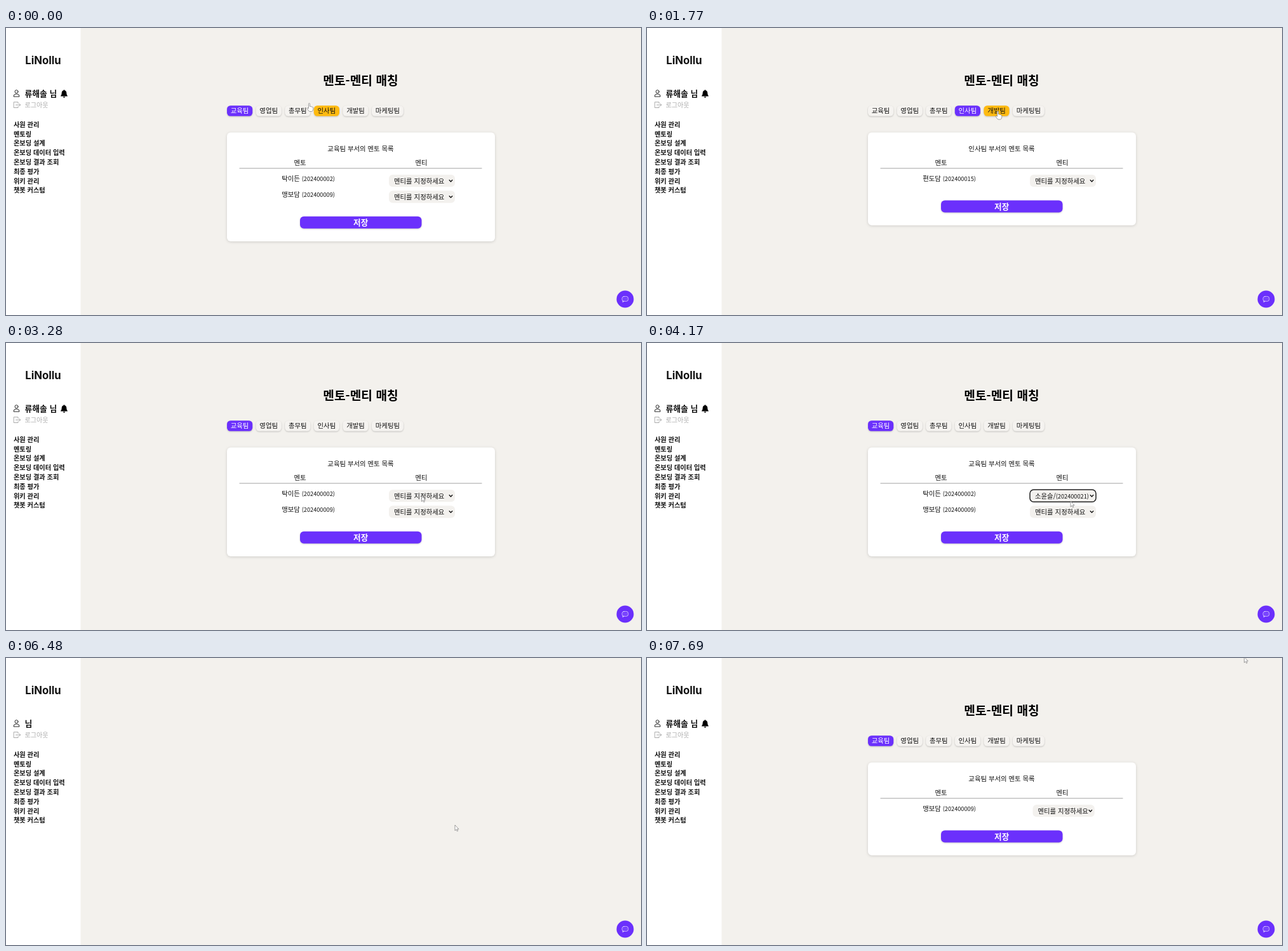
An HTML page that plays this animation: 1000 by 452 pixels, repeating every 7760 ms.

```html
<!DOCTYPE html>
<html lang="ko">
<head>
<meta charset="utf-8">
<title>멘토-멘티 매칭</title>
<style>
  html, body { margin: 0; width: 100%; height: 100%; overflow: hidden; background: #f3f1ed; }
  svg { display: block; width: 1000px; height: 452px; }
  text { font-family: "Noto Sans CJK KR", "Noto Sans CJK", sans-serif; font-size: 10.4px; fill: #111; }
  .b { font-weight: 700; }
  .m { text-anchor: middle; }
  .num { font-size: 9.2px; }
  .logo { font: 700 16.7px Inter, sans-serif; }
  .title { font-size: 19.2px; fill: #000; }
  .user { font-size: 12.8px; }
  .menu { font-size: 10.2px; }
  .exit { font-size: 10.1px; fill: #aaa; }
  .save { font-size: 12.6px; fill: #fff; }
  .on { fill: #fff; }
  .line { fill: none; stroke-linecap: round; stroke-linejoin: round; }
  .soft { filter: drop-shadow(.5px 1px 1.2px rgba(0, 0, 0, .2)); }
  .card { filter: drop-shadow(0 1px 2px rgba(0, 0, 0, .15)); }
</style>
</head>
<body>
<svg viewBox="0 0 1000 452">
  <rect width="1000" height="452" fill="#f3f1ed"/>
  <rect width="117.5" height="452" fill="#fff"/>
  <g id="side"></g>
  <g id="main"></g>
  <circle cx="975" cy="427" r="13.5" fill="#6b30fc"/>
  <g class="line" stroke="#fff" stroke-width=".8" opacity=".85">
    <rect x="970.2" y="423" width="9.6" height="7.2" rx="2.8"/>
    <path d="M971.5 429.8l-.4 2 2.2-1.5"/>
    <path d="M972.7 426.7h5" stroke-width="1.1" stroke-dasharray=".1 2.3"/>
  </g>
  <g id="cursor" stroke="#777" stroke-width=".7" stroke-linejoin="round" fill="#fff">
    <path id="arrow" d="M0 0v8.8l2-1.8 1.4 2.9 1.4-.7-1.4-2.8h2.6z"/>
    <path id="hand" d="M-1 1q0-1 1-1t1 1v4q2-.6 2.4.5 1.6-.3 1.8.7 1-.1 1 1v2.2q0 3.2-2.2 3.6h-3.4q-1.4-.4-3.6-4-.8-1.4 0-1.8 1-.3 2 1.2z"/>
  </g>
</svg>
<script>
const LOOP = 7760, PURPLE = "#6b30fc", AMBER = "#ffba10", GREY = "#f3f1ee";
const HIDE = 6400, RELOAD = 6590;
const $ = id => document.getElementById(id);

const menu = ["사원 관리", "멘토링", "온보딩 설계", "온보딩 데이터 입력",
  "온보딩 결과 조회", "최종 평가", "위키 관리", "챗봇 커스텀"];
const mentors = ["탁이든 02,맹보담 09", "표라온 10,국여울 11", "엄슬찬 12,봉다솔 13",
  "편도담 15", "빈누리 16,옥가람 17", "제아련 18,방한결 19"].map(s => s.split(","));
const tabs = ["교육팀", "영업팀", "총무팀", "인사팀", "개발팀", "마케팅팀"].map((label, i) =>
  ({ label, x: 348 + 45.6 * i, w: 11.4 + 9.6 * label.length }));

// start, end, then a tab to visit or a point
const overTab = (from, to, tab) => ({ from, to, tab, x: tabs[tab].x + tabs[tab].w / 2 + 2, y: 131 });
const toPoint = (from, to, x, y) => ({ from, to, x, y });
const moves = [
  overTab(180, 450, 1), overTab(940, 1120, 2), overTab(1240, 1450, 3),
  overTab(1670, 1770, 4), overTab(2020, 2160, 5), overTab(2410, 2800, 0),
  toPoint(2880, 3380, 655, 241), toPoint(3550, 3710, 667, 249), toPoint(4170, 4500, 672, 258),
  toPoint(4860, 5300, 598, 222.5), toPoint(5400, 5600, 560, 303),
  toPoint(5910, 6480, 707, 263), toPoint(6690, 7690, 940.5, -1.5)
];

const text = (s, x, y, cls = "") => `<text x="${x}" y="${y}" class="${cls}">${s}</text>`;
const box = (x, y, w, h, r, fill, extra = "") =>
  `<rect x="${x}" y="${y}" width="${w}" height="${h}" rx="${r}" fill="${fill}" ${extra}/>`;
const num = id => `<tspan class="num">(2024000${id})</tspan>`;

function drawSide(blank) {
  const bell = `<path d="M91.5 97.2q.9 0 .9 1.1 2.9.7 2.9 4.2 0 3 1.6 4.4v.6H86.1v-.6q1.6-1.4 1.6-4.4 0-3.5 2.9-4.2 0-1.1.9-1.1zM89.8 108.2h3.4q-.3 1.6-1.7 1.6t-1.7-1.6z"/>`;
  return text("LiNollu", 58.5, 57, "logo m")
    + `<g class="line" stroke="#222" stroke-width=".95"><circle cx="16.5" cy="100.2" r="2.5"/>
       <path d="M12 107.7q0-3.6 3-3.6h3q3 0 3 3.6z"/></g>`
    + text(blank ? "님" : "류해솔 님", 29.5, 107.5, "b user") + (blank ? "" : bell)
    + `<path class="line" stroke="#aaa" d="M19 118.6v-1.9h-6.8v8.8H19v-1.9M15.5 121.1h7.2m-2-2 2 2-2 2"/>`
    + text("로그아웃", 29.5, 125, "exit")
    + menu.map((m, i) => text(m, 12, 155.8 + i * 14.8, "b menu")).join("");
}

function drawSelect(y, { focus, chosen, narrow }) {
  const inset = narrow ? 4.5 : 0, x = 603 + inset, right = 707 - inset / 2;
  return box(x, y, right - x, 19.2, 6, GREY, focus ? 'stroke="#222" stroke-width="1.5"' : "")
    + text(chosen ? "소윤슬/" + num(21) : "멘티를 지정하세요", x + 8, y + 13.8)
    + `<path class="line" stroke="#111" stroke-width="1.4" d="M${right - 8.8} ${y + 8.6}l2.3 2.3 2.3-2.3"/>`;
}

function drawMain({ tab, hover, focus, chosen, saved }) {
  const rows = saved ? mentors[0].slice(1) : mentors[tab];
  const grow = (rows.length - 1) * 25.2;
  let s = text("멘토-멘티 매칭", 558.5, 90.3, "b m title");
  tabs.forEach(({ label, x, w }, i) => {
    const fill = i === tab ? PURPLE : i === hover ? AMBER : "#f5f3f0";
    s += box(x, 122.2, w, 16.6, 5.5, fill, 'class="soft"')
      + text(label, x + w / 2, 134, i === tab ? "m on" : "m");
  });
  s += box(348, 164.5, 422, 146.3 + grow, 6, "#fff", 'class="card"')
    + text(tabs[tab].label + " 부서의 멘토 목록", 558.5, 193.8, "m")
    + text("멘토", 463, 215.8, "m") + text("멘티", 654, 215.8, "m")
    + box(367.5, 220.5, 382, 1, 0, "#a2a2a2");
  rows.forEach((row, i) => {
    const y = 231 + i * 25.2, [who, id] = row.split(" ");
    s += text(who + " " + num(id), 476, y + 9.5, "m")
      + drawSelect(y, { focus: focus && !i, chosen: chosen && !i, narrow: saved });
  });
  return s + box(463, 271.6 + grow, 191.5, 19, 6, PURPLE, 'class="soft"')
    + text("저장", 558.7, 285.5 + grow, "b m save");
}

function pointerAt(t) {
  let x = 477.5, y = 118.5;
  for (const m of moves) {
    if (t < m.from) break;
    const k = 1 - (1 - Math.min(1, (t - m.from) / (m.to - m.from))) ** 4;
    x += (m.x - x) * k;
    y += (m.y - y) * k;
  }
  return [x, y];
}

// A tab is picked just as the pointer leaves it.
function tabAt(t) {
  const left = moves.filter((m, i) => "tab" in m && t >= moves[i + 1].from);
  return left.length ? left[left.length - 1].tab : 0;
}

const start = performance.now();
let shown = "";
function frame(now) {
  const t = Math.max(0, now - start) % LOOP;
  const [x, y] = pointerAt(t);
  const blank = t >= HIDE && t < RELOAD;
  const over = Math.abs(y - 130.5) < 8.5 ? tabs.findIndex(b => x >= b.x && x <= b.x + b.w) : -1;
  const state = {
    tab: tabAt(t),
    hover: t < moves[0].from ? 3 : over,
    focus: t >= 3380 && t < 4500,
    chosen: t >= 4170 && t < HIDE,
    saved: t >= RELOAD,
    blank
  };
  const key = JSON.stringify(state);
  if (key !== shown) {
    shown = key;
    $("side").innerHTML = drawSide(blank);
    $("main").innerHTML = blank ? "" : drawMain(state);
  }
  const onSave = t < HIDE && Math.abs(x - 559) < 96 && Math.abs(y - 306) < 10;
  const hand = state.hover >= 0 || onSave;
  $("hand").style.display = hand ? "" : "none";
  $("arrow").style.display = hand ? "none" : "";
  $("cursor").setAttribute("transform", `translate(${x} ${y})`);
  requestAnimationFrame(frame);
}
frame(start);
</script>
</body>
</html>
```
